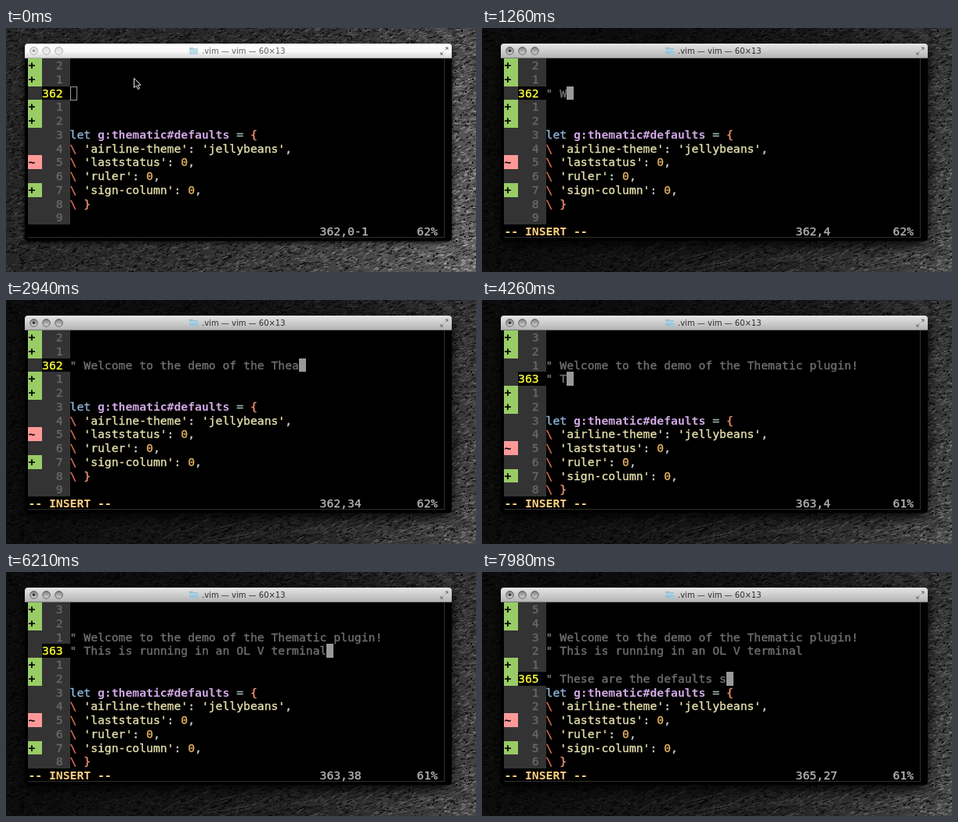
Animation, 600 px wide and 313 px high, one loop 8 s. Source, as an HTML page with a canvas:

```html
<!DOCTYPE html>
<html lang="en">
<head>
<meta charset="utf-8">
<title>Terminal typing</title>
<style>
  html, body { margin: 0; width: 100%; height: 100%; overflow: hidden; background: #000; }
  canvas { display: block; width: 600px; height: 313px; }
</style>
</head>
<body>
<canvas id="stage" width="600" height="313"></canvas>
<script>
const W = 600, H = 313, LOOP = 8000;
const ctx = document.getElementById('stage').getContext('2d');

// Terminal grid
const LEFT = 28.4, TOP = 39.2, CELL = 8.86, ROW = 17.75;
const MONO = '14.72px "DejaVu Sans Mono", monospace';
const colX = c => LEFT + c * CELL;
const rowY = r => TOP + r * ROW;

// Moments in ms
const FOCUS = 420, INSERT = 780, ERASE = 3050, ENTER = 4050, DOWN = [6330, 6450];

const TYPO = '" Welcome to the demo of the Thea';
const WELCOME = '" Welcome to the demo of the Thematic plugin!';
const RUNNING = '" This is running in an OL V terminal';
const DEFAULTS = '" These are the defaults s';

const COLOR = {
  comment: '#707070', number: '#686868', gutter: '#333', current: '#ffff3c',
  plain: '#cfcfcf', key: '#8fb4d6', name: '#d0a8e4', op: '#9ab0b0',
  brace: '#f09070', slash: '#dc6e58', string: '#e4e0ac', value: '#e4b262',
  added: '#99cc66', changed: '#ff9999', mode: '#ffd080', status: '#b4b4b4'
};

const entry = (key, value) => [
  ['\\ ', 'slash'], [key, 'string'], [': ', 'plain'],
  [value, value === '0' ? 'value' : 'string'], [',', 'plain']
];
const CODE = [
  [['let ', 'key'], ['g:thematic#defaults', 'name', true], [' = ', 'op'], ['{', 'brace']],
  entry("'airline-theme'", "'jellybeans'"),
  entry("'laststatus'", '0'),
  entry("'ruler'", '0'),
  entry("'sign-column'", '0'),
  [['\\ ', 'slash'], ['}', 'brace']],
  []
];

function random(seed) {
  return () => {
    seed = (seed + 0x6D2B79F5) | 0;
    let v = Math.imul(seed ^ (seed >>> 15), 1 | seed);
    v = (v + Math.imul(v ^ (v >>> 7), 61 | v)) ^ v;
    return ((v ^ (v >>> 14)) >>> 0) / 4294967296;
  };
}

// Brushed dark metal, lighter towards the lower right
function metal(lift) {
  const layer = document.createElement('canvas');
  layer.width = W;
  layer.height = H;
  const g = layer.getContext('2d');
  const rnd = random(71);
  const tone = (x, y) => 8 + lift + 42 * Math.pow(x / W, 3) + 22 * (x / W) * (y / H);

  const scratch = (x, y, len, angle, shade, width) => {
    g.strokeStyle = shade;
    g.lineWidth = width;
    g.beginPath();
    g.moveTo(x, y);
    g.lineTo(x + Math.cos(angle) * len, y + Math.sin(angle) * len);
    g.stroke();
  };
  const gray = (v, alpha) => `rgba(${v},${v},${v},${alpha})`;

  for (let x = 0; x < W; x += 8) {
    for (let y = 0; y < H; y += 8) {
      g.fillStyle = gray(Math.round(tone(x, y)), 1);
      g.fillRect(x, y, 8, 8);
    }
  }
  // Fine brushing
  for (let i = 0; i < 16000; i++) {
    const x = rnd() * W, y = rnd() * H;
    const v = Math.round(tone(x, y) * (rnd() < .55 ? .2 : 1.9));
    scratch(x, y, 2 + rnd() * 5, -.3 + (rnd() - .5) * .8, gray(v, .75), .6 + rnd() * .8);
  }
  // Dark pits and bright specks
  for (let i = 0; i < 2600; i++) {
    const x = rnd() * W, y = rnd() * H, size = 1 + Math.floor(rnd() * 2);
    const bright = rnd() < .4;
    g.fillStyle = bright ? gray(Math.round(tone(x, y) + 45), .8) : gray(0, .8);
    g.fillRect(Math.floor(x), Math.floor(y), bright ? 1 : size, bright ? 1 : size);
  }
  // Long scratches near the lower right
  for (let i = 0; i < 60; i++) {
    const x = 200 + rnd() * 400, y = 265 + rnd() * 60;
    scratch(x, y, 15 + rnd() * 70, -.1 - rnd() * .5, gray(150, .35), .7);
  }
  return layer;
}
const backdrops = { idle: metal(30), active: metal(4) };

function rect(x, y, w, h, color) {
  ctx.fillStyle = color;
  ctx.fillRect(x, y, w, h);
}

// Fills whole cells, snapped to pixels
function cells(col, row, cols, rows, color) {
  const x = Math.round(colX(col)), y = Math.round(rowY(row));
  rect(x, y, Math.round(colX(col + cols)) - x, Math.round(rowY(row + rows)) - y, color);
}

function print(text, col, row, color, bold) {
  ctx.font = (bold ? 'bold ' : '') + MONO;
  ctx.fillStyle = ctx.strokeStyle = color;
  ctx.lineWidth = .35;
  for (const ch of text) {
    if (ch !== ' ') {
      ctx.fillText(ch, colX(col), rowY(row) + 14);
      if (!bold) ctx.strokeText(ch, colX(col), rowY(row) + 14);
    }
    col++;
  }
  return col;
}

function rounded(x, y, w, h, radii) {
  ctx.beginPath();
  ctx.roundRect(x, y, w, h, radii);
}

// Number of characters present, from [time, count] points
function count(points, t) {
  let n = points[0][1];
  for (let i = 1; i < points.length; i++) {
    const [t0, a] = points[i - 1], [t1, b] = points[i];
    if (t >= t0) n = a + (b - a) * Math.min(1, (t - t0) / (t1 - t0));
  }
  return Math.floor(n + 1e-6);
}

function state(t) {
  const first = t < ERASE
    ? TYPO.slice(0, count([[900, 0], [1240, 3], [2920, 33]], t))
    : WELCOME.slice(0, count([[3150, 32], [3900, 45]], t));
  const second = RUNNING.slice(0, count([[ENTER, 2], [4240, 3], [5030, 20], [6190, 37]], t));
  const third = DEFAULTS.slice(0, count([[6600, 0], [7970, 26]], t));
  const split = t >= ENTER;
  const row = split ? 3 + DOWN.filter(d => t >= d).length : 2;
  return {
    split, row,
    focused: t >= FOCUS,
    insert: t >= INSERT,
    lines: split ? ['', '', first, second, '', third] : ['', '', first, '', '']
  };
}

function titleBar(focused) {
  const fill = ctx.createLinearGradient(0, 20, 0, 39);
  fill.addColorStop(0, focused ? '#e6e6e6' : '#ffffff');
  fill.addColorStop(.5, focused ? '#cccccc' : '#fafafa');
  fill.addColorStop(1, focused ? '#b2b2b2' : '#d6d6d6');
  rounded(24, 20, 545, 19, [4, 4, 0, 0]);
  ctx.fillStyle = fill;
  ctx.fill();
  rect(24, 38, 545, 1, focused ? '#777' : '#aaa');

  for (const [i, x] of [35.5, 51.5, 67.5].entries()) {
    const dot = ctx.createLinearGradient(0, 24, 0, 35);
    dot.addColorStop(0, focused ? '#777' : '#ddd');
    dot.addColorStop(1, focused ? '#e0e0e0' : '#f4f4f4');
    ctx.beginPath();
    ctx.arc(x, 29.3, 4.8, 0, Math.PI * 2);
    ctx.fillStyle = dot;
    ctx.fill();
    ctx.strokeStyle = focused ? '#606060' : '#aaa';
    ctx.lineWidth = 1;
    ctx.stroke();
    if (i === 0) {
      ctx.beginPath();
      ctx.arc(x, 29.3, 1.7, 0, Math.PI * 2);
      ctx.fillStyle = focused ? '#333' : '#999';
      ctx.fill();
    }
  }

  ctx.globalAlpha = focused ? 1 : .6;
  rect(234, 25, 5, 2, '#8cb6c8');
  rect(234, 26, 11, 8, '#9cc6d6');
  rect(234, 28, 11, 1, '#c0dee8');
  ctx.globalAlpha = 1;

  ctx.font = '10px "DejaVu Sans", sans-serif';
  ctx.fillStyle = focused ? '#2c2c2c' : '#606060';
  ctx.fillText('.vim — vim — 60×13', 250, 33);

  ctx.strokeStyle = ctx.fillStyle = '#777';
  for (const d of [1, -1]) {
    ctx.beginPath();
    ctx.moveTo(559.5 + d, 29.5 - d);
    ctx.lineTo(559.5 + 4 * d, 29.5 - 4 * d);
    ctx.stroke();
    ctx.beginPath();
    ctx.moveTo(559.5 + 5 * d, 29.5 - 5 * d);
    ctx.lineTo(559.5 + 5 * d, 29.5 - d);
    ctx.lineTo(559.5 + d, 29.5 - 5 * d);
    ctx.fill();
  }
}

function gutter(s) {
  const code = s.lines.length;
  const added = [0, 1, code - 2, code - 1, code + 4];
  const changed = code + 2;
  cells(0, 0, 6, 12, COLOR.gutter);
  for (let r = 0; r < 12; r++) {
    const sign = added.includes(r) ? '+' : r === changed ? '~' : '';
    if (sign) {
      cells(0, r, 2, 1, sign === '+' ? COLOR.added : COLOR.changed);
      print(sign, 0, r, '#000', true);
    }
    if (r === s.row) {
      cells(2, r, 4, 1, '#000');
      print(String(360 + r), 2, r, COLOR.current);
    } else {
      print(String(Math.abs(r - s.row)).padStart(3), 2, r, COLOR.number);
    }
  }
}

function cursor(s, column) {
  if (s.focused) {
    cells(6 + column, s.row, 1, 1, '#999');
    return;
  }
  ctx.strokeStyle = '#999';
  ctx.lineWidth = 1;
  ctx.strokeRect(Math.round(colX(6 + column)) + .5, Math.round(rowY(s.row)) + .5, 8, 17);
}

function pointer(x, y) {
  ctx.save();
  ctx.translate(x, y);
  ctx.beginPath();
  for (const [px, py] of [[0, 0], [0, 12], [3, 9.4], [5, 14], [7, 13], [5, 8.8], [8.5, 8.5]]) {
    ctx.lineTo(px, py);
  }
  ctx.closePath();
  ctx.fillStyle = '#000';
  ctx.fill();
  ctx.strokeStyle = '#eee';
  ctx.lineWidth = 1;
  ctx.stroke();
  ctx.restore();
}

function draw(t) {
  const s = state(t);
  ctx.drawImage(s.focused ? backdrops.active : backdrops.idle, 0, 0);

  ctx.save();
  ctx.shadowColor = '#000';
  ctx.shadowBlur = s.focused ? 16 : 6;
  ctx.shadowOffsetY = s.focused ? 6 : 2;
  rounded(24, 20, 545, 253, 4);
  ctx.fillStyle = '#000';
  ctx.fill();
  ctx.restore();

  titleBar(s.focused);
  rect(559, 39, 1, 230, '#303030');
  rect(28, 268, 532, 1, '#303030');
  gutter(s);

  const column = s.lines[s.row].length;
  cursor(s, column);
  s.lines.forEach((line, r) => print(line, 6, r, COLOR.comment));
  CODE.forEach((runs, i) => {
    const r = s.lines.length + i;
    if (r > 11) return;
    let col = 6;
    for (const [text, color, bold] of runs) col = print(text, col, r, COLOR[color], bold);
  });

  if (s.insert) print('-- INSERT --', 0, 12, COLOR.mode, true);
  const place = s.insert ? column + 1 : '0-1';
  print(`${360 + s.row},${place}`, 42, 12, COLOR.status);
  print(s.split ? '61%' : '62%', 56, 12, COLOR.status);

  if (!s.insert) pointer(163.5, 64.5);
}

const start = performance.now();
function tick() {
  draw((performance.now() - start) % LOOP);
  requestAnimationFrame(tick);
}
tick();
</script>
</body>
</html>
```
